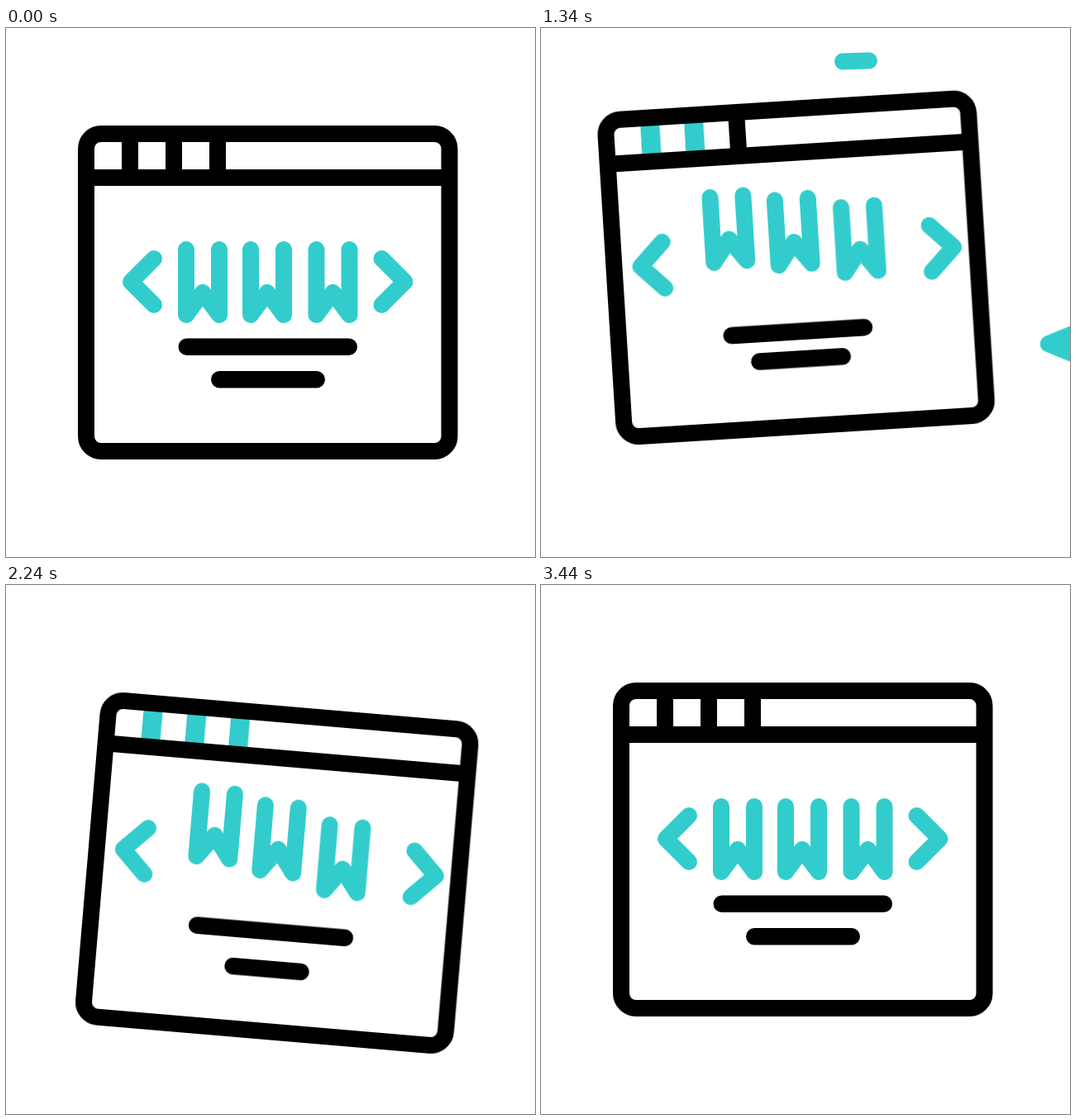
Recreate the animation shown at these times as an HTML page. Size 640 px wide and 640 px high, loop 3.56 s.

```html
<!DOCTYPE html>
<html lang="en">
<head>
<meta charset="utf-8">
<title>Browser window</title>
<style>
  html, body { margin: 0; width: 100%; height: 100%; overflow: hidden; background: #fff; }
  svg { display: block; width: 100%; height: 100%; }
  .ink, .teal { fill: none; stroke: #000; stroke-width: 20; stroke-linecap: round; stroke-linejoin: round; }
  .teal { stroke: #33cccc; }

  .move {
    animation: 3560ms linear infinite;
    animation-delay: var(--delay, 0ms);
    --sine: cubic-bezier(.364, 0, .636, 1);
  }
  .sine { animation-timing-function: var(--sine); }
  .lift { animation-name: lift; }
  .tilt { animation-name: tilt; transform-origin: 316.5px 450px; }
  .letter { animation-name: hop; }
  .angle { animation-name: spread; }
  .tab { animation-name: tint; fill: #33cccc; opacity: 0; }
  .bar { animation-name: squash; x: var(--x); width: var(--w); }
  .cursor { animation-name: visit; transform: translate(670px, 371px) rotate(-31deg); }
  .ray { animation-name: burst; transform: scale(0); transform-box: fill-box; transform-origin: center; }
  .late { animation-name: burst-late; }

  .second { --delay: 100ms; }
  .third { --delay: 200ms; }

  @keyframes lift {
    0%, 16.85% { transform: none; }
    32.02% { transform: translateY(-54px); }
    50.56%, 52.53% { transform: translateY(57.5px); }
    73.03%, 100% { transform: none; }
  }
  @keyframes tilt {
    0%, 32.02% { transform: rotate(0deg); }
    36.52% { transform: rotate(-3.95deg); }
    63.06% { transform: rotate(4.9deg); }
    81.6%, 100% { transform: rotate(0deg); }
  }
  @keyframes hop {
    0%, 26.4% { transform: translateY(0); }
    38.76%, 64.04% { transform: translateY(-40px); }
    51.4%, 76.69% { transform: translateY(12px); }
    84.27%, 100% { transform: translateY(0); }
  }
  @keyframes spread {
    0%, 21.35% { transform: translateX(0); }
    33.71%, 82.02% { transform: translateX(var(--dx)); }
    94.38%, 100% { transform: translateX(0); }
  }
  @keyframes tint {
    0%, 32.16% { opacity: 0; }
    34.41%, 85.96% { opacity: 1; }
    89.33%, 100% { opacity: 0; }
  }
  @keyframes squash {
    0%, 29.78% { x: var(--x); width: var(--w); transform: translate(0, 0); }
    44.66%, 53.09% {
      x: calc(var(--x) + 32.5px);
      width: calc(var(--w) - 65px);
      transform: translate(-4.8px, 21px);
    }
    67.98%, 100% { x: var(--x); width: var(--w); transform: translate(0, 0); }
  }
  @keyframes visit {
    0% { transform: translate(670px, 371px) rotate(-31deg); }
    6.18% {
      transform: translate(670px, 371px) rotate(-31deg);
      animation-timing-function: cubic-bezier(.33, .67, .67, 1);
    }
    18.54% { transform: translate(342px, 436px) rotate(0deg); }
    20.79% {
      transform: translate(342px, 436px) rotate(0deg);
      animation-timing-function: cubic-bezier(.333, 0, .667, .333);
    }
    39.33%, 100% { transform: translate(670px, 371px) rotate(-31deg); }
  }
  @keyframes burst {
    0%, 16.85% { transform: scale(0); }
    19.38%, 19.94% { transform: scale(1); }
    23.03%, 100% { transform: scale(0); }
  }
  @keyframes burst-late {
    0%, 33.15% { transform: scale(0); }
    35.67%, 37.92% { transform: scale(1); }
    41.01%, 100% { transform: scale(0); }
  }
</style>
</head>
<body>
<svg viewBox="0 0 640 640">
  <defs>
    <path id="w" d="M0 0V79L20 52L40 79V0"/>
  </defs>

  <g class="move sine lift">
    <g class="move tilt">
      <path class="ink" d="M150 138V172M203 138V172M256 138V172" stroke-linecap="butt"/>
      <rect class="move tab" x="139.5" y="137" width="23" height="36"/>
      <rect class="move tab second" x="192.5" y="137" width="23" height="36"/>
      <rect class="move tab third" x="245.5" y="137" width="23" height="36"/>
      <rect class="ink" x="97" y="128" width="439.5" height="384" rx="18"/>
      <path class="ink" d="M97 181H536"/>

      <rect class="move sine bar" style="--x: 208.5px; --w: 216.5px" y="375.5" height="20.5" rx="10.25"/>
      <rect class="move sine bar second" style="--x: 248px; --w: 138px" y="415" height="20.5" rx="10.25"/>

      <g class="teal">
        <path class="move sine angle" style="--dx: -22px" d="M179 279L151 307L179 335"/>
        <path class="move sine angle" style="--dx: 26px" d="M454.500 279L482.500 307L454.500 335"/>
        <g class="move sine letter"><use href="#w" x="218" y="268"/></g>
        <g class="move sine letter second"><use href="#w" x="296" y="268"/></g>
        <g class="move sine letter third"><use href="#w" x="375.500" y="268"/></g>
      </g>
    </g>
  </g>

  <g class="teal">
    <path class="move ray" d="M222.500 457L233 450.500"/>
    <path class="move ray" d="M280 493L285.500 469"/>
    <path class="move ray" d="M339.500 481.500L344 494.500"/>
    <path class="move ray late" d="M365 40.500L397 39.500"/>
    <path class="move cursor" d="M0 0L86 5L60 25L58 64Z"/>
  </g>
</svg>
</body>
</html>
```
